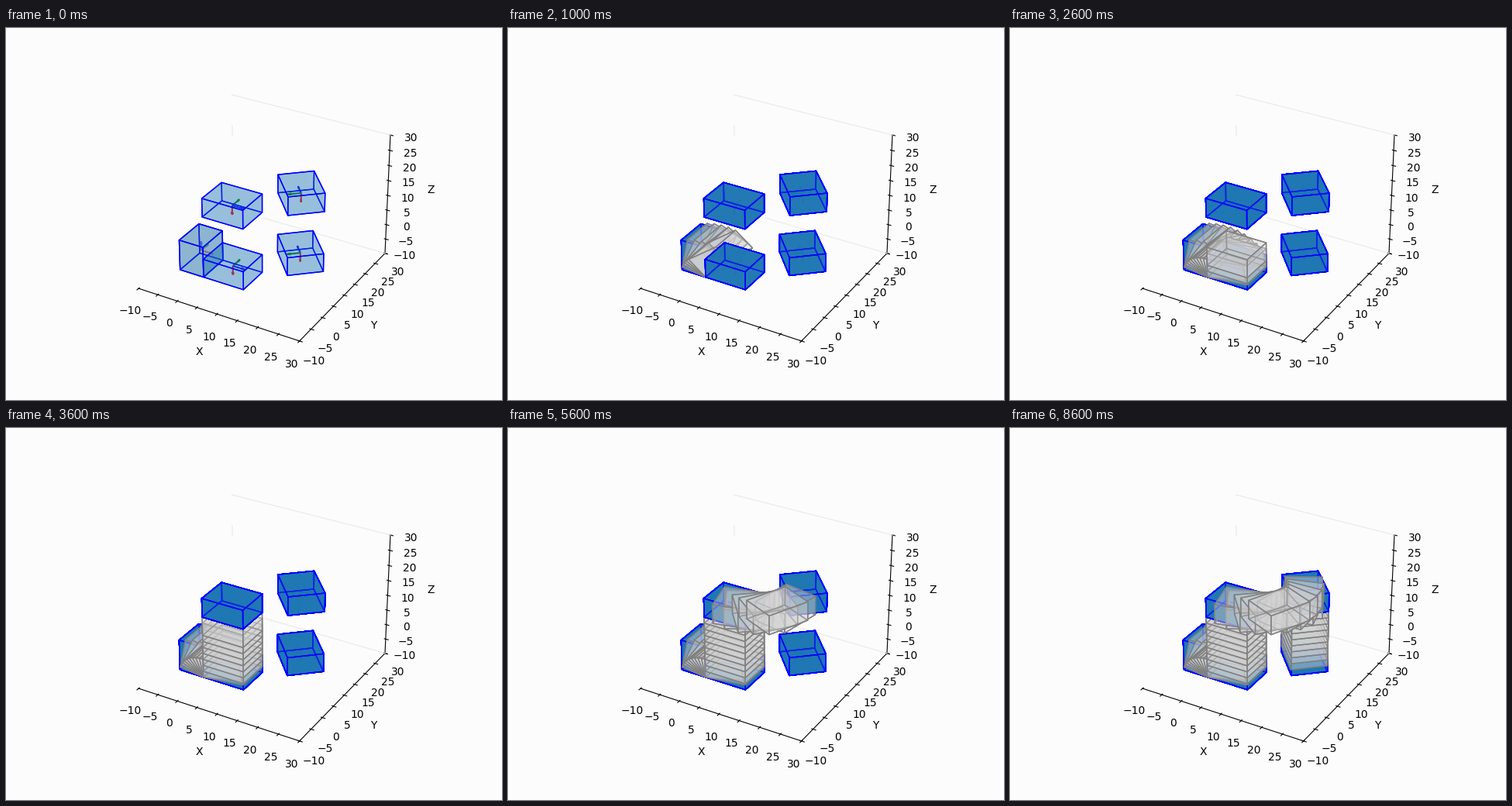
These frames come from a looping animation (640x480 px, 8800 ms). A matplotlib script:

```python
from itertools import product

import matplotlib.pyplot as plt
import numpy as np
from matplotlib.animation import FuncAnimation
from matplotlib.colors import to_rgba
from mpl_toolkits.mplot3d.art3d import Poly3DCollection

STEPS = 11             # poses per move
FRAMES = 4 * STEPS
INTERVAL = 200
MAX_LAYERS = 16        # repeated coats look solid well before this
ALPHA = 0.26
BACKGROUND = "#fcfcfc"

HALF_SIZE = np.array([3, 4, 5])
PIVOT = np.array([3, 0, -5])
LIFT = np.array([0, 0, 20])
TURN = 2.3
CORNERS = np.array(list(product((-1, 1), repeat=3)))
FACES = [(0, 1, 3, 2), (4, 5, 7, 6), (0, 1, 5, 4),
         (2, 3, 7, 6), (0, 2, 6, 4), (1, 3, 7, 5)]


def rot_y(angle):
    c, s = np.cos(angle), np.sin(angle)
    return np.array([[c, 0, s], [0, 1, 0], [-s, 0, c]])


def rot_z(angle):
    c, s = np.cos(angle), np.sin(angle)
    return np.array([[c, -s, 0], [s, c, 0], [0, 0, 1]])


FLAT = rot_y(np.pi / 2)
START = np.array([8, 0, -2])
END = np.array([18, 12, -2])
# Vertical axis that carries START to END in one turn
dx, dy, _ = (END - START) / 2
AXIS = (START + END) / 2 + np.array([-dy, dx, 0]) / np.tan(TURN / 2)


def pose(frame):
    """Centre and rotation: tip over, lift, swing round, lower."""
    move, step = divmod(frame, STEPS)
    t = step / (STEPS - 1)
    if move == 0:
        tip = rot_y(t * np.pi / 2)
        return PIVOT - tip @ PIVOT, tip
    if move == 1:
        return START + t * LIFT, FLAT
    if move == 2:
        turn = rot_z(t * TURN)
        return AXIS + turn @ (START - AXIS) + LIFT, turn @ FLAT
    return END + (1 - t) * LIFT, rot_z(TURN) @ FLAT


def add_box(frame, face, edge, scale=1.0):
    centre, rotation = pose(frame)
    points = centre + (CORNERS * HALF_SIZE * scale) @ rotation.T
    box = Poly3DCollection([points[list(f)] for f in FACES], linewidths=1,
                           facecolors=to_rgba(face, ALPHA), edgecolors=edge)
    return ax.add_collection3d(box)


fig = plt.figure(figsize=(6.4, 4.8), dpi=100, facecolor=BACKGROUND)
ax = fig.add_subplot(projection="3d", facecolor=BACKGROUND)
ax.grid(False)
for axis in (ax.xaxis, ax.yaxis, ax.zaxis):
    axis.set_pane_color((1, 1, 1, 0))

# Faint remains of the back wall's outline
for xs, zs in (((-10, 30), (30, 30)), ((-2, 30), (-10, -10)),
               ((-10, -10), (16.2, 19.5))):
    ax.plot(xs, (30, 30), zs, color="#ebebeb", lw=0.9)

key_frames = [0] + [move * STEPS - 1 for move in range(1, 5)]
for frame in key_frames:
    centre, rotation = pose(frame)
    for direction, color in zip(rotation.T, "rgb"):
        ax.quiver(*centre, *direction, length=3, color=color)

# Slightly smaller, so that a key box covers a trail box in the same pose
trail = [add_box(n, "lightgray", "gray", 0.9999) for n in range(FRAMES)]
layers = [[add_box(n, "C0", "b") for n in key_frames]
          for _ in range(MAX_LAYERS)]

ax.set(xlim=(-10, 30), ylim=(-10, 30), zlim=(-10, 30),
       xlabel="X", ylabel="Y", zlabel="Z")


def update(frame):
    for n, box in enumerate(trail):
        box.set_visible(n <= frame)
    for n, layer in enumerate(layers):
        for box in layer:
            box.set_visible(n <= frame)
    return []


animation = FuncAnimation(fig, update, frames=FRAMES, interval=INTERVAL,
                          repeat=True, repeat_delay=0)
plt.show()
```
